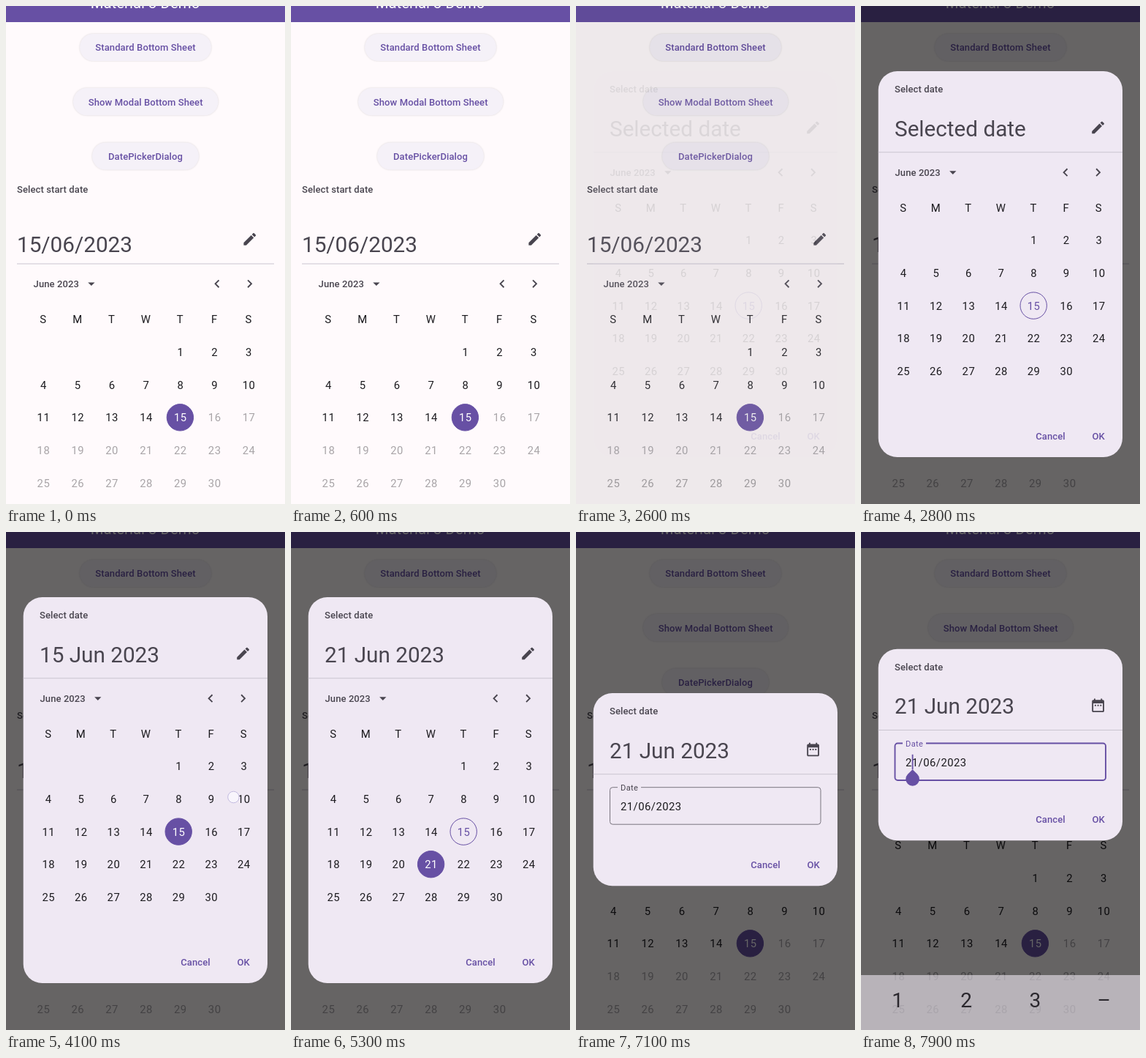
Recreate the animation shown at these times as an HTML page. Size 382 by 680 pixels, loop 8 s.

```html
<!DOCTYPE html>
<html lang="en">
<head>
<meta charset="utf-8">
<title>Date picker</title>
<style>
html, body { margin: 0; width: 100%; height: 100%; overflow: hidden; background: #fffafc; }
svg { display: block; width: 382px; height: 680px; font-family: Roboto, Arial, sans-serif; }
.pill { filter: drop-shadow(0 0.9px 0.9px rgba(0, 0, 0, .15)); }
</style>
</head>
<body>
<svg id="stage" viewBox="0 0 382 680"></svg>
<script>
const LOOP = 8000;
const PRIMARY = '#6750A4', INK = '#1C1B1F', MUTED = '#49454F', RULE = '#CAC4D0';
const SHEET = '#EFE8F3';
const ICONS = {
  edit: 'M3 17.25V21h3.75L17.81 9.94l-3.75-3.75L3 17.25zM20.71 7.04c.39-.39.39-1.02 0-1.41l-2.34-2.34c-.39-.39-1.02-.39-1.41 0l-1.83 1.83 3.75 3.75 1.83-1.83z',
  date: 'M9 11H7v2h2v-2zm4 0h-2v2h2v-2zm4 0h-2v2h2v-2zm2-7h-1V2h-2v2H8V2H6v2H5c-1.11 0-2 .9-2 2v14c0 1.1.89 2 2 2h14c1.1 0 2-.9 2-2V6c0-1.1-.9-2-2-2zm0 16H5V9h14v11z',
  prev: 'M15.41 7.41L14 6l-6 6 6 6 1.41-1.41L10.83 12z',
  next: 'M8.59 16.59L13.17 12 8.59 7.41 10 6l6 6-6 6z',
  drop: 'M7 10l5 5 5-5z'
};
const stage = document.getElementById('stage');

function add(parent, tag, attrs = {}) {
  const node = document.createElementNS('http://www.w3.org/2000/svg', tag);
  for (const key in attrs) node.setAttribute(key, attrs[key]);
  parent.appendChild(node);
  return node;
}
const group = (parent) => add(parent, 'g');
const rect = (parent, x, y, width, height, fill, extra) =>
  add(parent, 'rect', { x, y, width, height, fill, ...extra });
const line = (parent, x1, x2, y) =>
  add(parent, 'line', { x1, x2, y1: y, y2: y, stroke: RULE, 'stroke-width': 1 });

// Text is placed by the vertical middle of its capitals.
function text(parent, str, x, mid, size, fill, extra) {
  const node = add(parent, 'text', { x, y: mid + size * 0.355, 'font-size': size, fill, ...extra });
  node.textContent = str;
  return node;
}
const CENTER = { 'text-anchor': 'middle' };
const LABEL = { 'font-weight': 500, 'letter-spacing': 0.1 };
const BODY = { 'letter-spacing': 0.46 };

function icon(parent, name, x, y) {
  return add(parent, 'path', {
    d: ICONS[name], fill: MUTED,
    transform: `translate(${x} ${y}) scale(.93) translate(-12 -12)`
  });
}

function monthBar(parent, x, y, arrows) {
  text(parent, 'June 2023', x, y, 13, MUTED, LABEL);
  icon(parent, 'drop', x + 79.3, y);
  icon(parent, 'prev', arrows, y);
  icon(parent, 'next', arrows + 44.6, y);
}

// Returns a function that marks the selected day.
function calendar(parent, x0, stepX, y0, lastEnabled) {
  const stepY = 44.6, cells = [];
  [...'SMTWTFS'].forEach((d, i) => text(parent, d, x0 + i * stepX, y0, 14.85, INK, { ...CENTER, ...BODY }));
  for (let day = 1; day <= 30; day++) {
    const slot = day + 3;
    const x = x0 + slot % 7 * stepX, y = y0 + (1 + Math.floor(slot / 7)) * stepY;
    const disc = add(parent, 'circle', { cx: x, cy: y, r: 18.2, fill: 'none', 'stroke-width': 1 });
    const label = text(parent, day, x + 0.4, y + 0.3, 14.85, INK, { ...CENTER, ...BODY });
    if (day > lastEnabled) label.setAttribute('opacity', 0.38);
    cells.push({ day, disc, label });
  }
  return (selected) => cells.forEach(({ day, disc, label }) => {
    const on = day === selected, today = day === 15;
    disc.setAttribute('fill', on ? PRIMARY : 'none');
    disc.setAttribute('stroke', on || today ? PRIMARY : 'none');
    label.setAttribute('fill', on ? '#fff' : today ? PRIMARY : INK);
  });
}

// Page
const page = group(stage);
rect(page, 0, 0, 382, 680, '#fffafc');
rect(page, 0, 0, 382, 22, PRIMARY);
text(page, 'Material 3 Demo', 190.5, -4.2, 20.4, '#fff', CENTER);
[['Standard Bottom Sheet', 101, 180, 56.5],
 ['Show Modal Bottom Sheet', 92, 198.5, 130.7],
 ['DatePickerDialog', 118, 146, 205]].forEach(([label, x, w, mid]) => {
  rect(page, x, mid - 18.6, w, 37.2, '#F5F1F8', { rx: 18.6, class: 'pill' });
  text(page, label, x + w / 2, mid + 0.2, 13, PRIMARY, { ...CENTER, ...LABEL });
});
text(page, 'Select start date', 15, 250.8, 13, MUTED, LABEL);
text(page, '15/06/2023', 15, 325, 29.7, MUTED);
icon(page, 'edit', 333.8, 318.3);
line(page, 15, 367, 352);
monthBar(page, 37.6, 379.3, 289);
calendar(page, 51, 46.85, 428, 15)(15);

const scrim = rect(stage, 0, 0, 382, 680, '#000');

// Dialog, drawn from its own top edge
const dialog = group(stage);
const sheet = rect(dialog, 23.7, 0, 334.3, 527, SHEET, { rx: 26 });
text(dialog, 'Select date', 46, 24.2, 13, MUTED, LABEL);
const headline = text(dialog, '', 46, 78, 29.7, MUTED);
const editIcon = icon(dialog, 'edit', 324.6, 77);
const dateIcon = icon(dialog, 'date', 324.6, 77);
line(dialog, 23.7, 358, 110.7);

const month = group(dialog);
monthBar(month, 46.5, 138.2, 280);
const markDay = calendar(month, 57.8, 44.6, 186.3, 30);

const entry = group(dialog);
const field = rect(entry, 46.5, 128.7, 288.5, 50.5, 'none', { rx: 3.7 });
rect(entry, 57, 124, 32, 9, SHEET);
const fieldLabel = text(entry, 'Date', 61, 128.9, 11.1, MUTED, { 'letter-spacing': 0.37 });
text(entry, '21/06/2023', 61, 154.7, 14.85, INK, BODY);
const caret = group(entry);
rect(caret, 69.7, 144, 1.8, 20.5, PRIMARY);
add(caret, 'path', {
  d: 'M70.6 164.4L77.2 171A9.3 9.3 0 1 1 64 171z', fill: PRIMARY
});

const actions = group(dialog);
text(actions, 'Cancel', 259.5, 0, 13, PRIMARY, { ...CENTER, ...LABEL });
text(actions, 'OK', 325.2, 0, 13, PRIMARY, { ...CENTER, ...LABEL });

// Keyboard
const keyboard = group(stage);
rect(keyboard, 0, 0, 382, 300, '#F3EDF7', { opacity: 0.58 });
['1', '2', '3', '–'].forEach((key, i) =>
  text(keyboard, key, 50 + i * 94.2, 34.5, 28, '#2B282E', CENTER));

const touch = add(stage, 'circle', { r: 7.8, fill: '#F8F5FC', stroke: '#C3BBE0', 'stroke-width': 1 });
const TAPS = [
  { from: 3500, to: 3750, x: 234, y: 406 },
  { from: 3980, to: 4400, x: 311.5, y: 362 },
  { from: 4850, to: 5200, x: 190, y: 452 },
  { from: 6400, to: 6820, x: 330.3, y: 146.5 }
];

const ramp = (t, from, to) => Math.min(1, Math.max(0, (t - from) / (to - from)));
const ease = (k) => k * k * (3 - 2 * k);
const show = (node, on) => node.setAttribute('display', on ? 'inline' : 'none');

function render(t) {
  const opened = ease(ramp(t, 2560, 2760));
  scrim.setAttribute('opacity', 0.6 * opened);
  dialog.setAttribute('opacity', opened);

  const selected = t < 3650 ? 0 : t < 4400 ? 15 : t < 5100 ? 10 : 21;
  headline.textContent = selected ? `${selected} Jun 2023` : 'Selected date';
  markDay(selected);

  const typing = t >= 6650;
  show(editIcon, !typing);
  show(dateIcon, typing);
  const swap = ease(ramp(t, 6710, 6950));
  month.setAttribute('opacity', 1 - swap);
  entry.setAttribute('opacity', swap);

  // The sheet keeps its height until the crossfade ends, then snaps.
  const compact = t >= 6950;
  const lift = ease(ramp(t, 7720, 7880));
  const top = compact ? 220 - 60.2 * lift : 89;
  const height = compact ? 263.3 - 1.8 * lift : 527;
  dialog.setAttribute('transform', `translate(0 ${top})`);
  sheet.setAttribute('height', height);
  actions.setAttribute('transform', `translate(0 ${height - 28.7})`);

  const focused = t >= 7560;
  field.setAttribute('stroke', focused ? PRIMARY : '#79747E');
  field.setAttribute('stroke-width', focused ? 1.9 : 1);
  fieldLabel.setAttribute('fill', focused ? PRIMARY : MUTED);
  show(caret, focused);

  const risen = ramp(t, 7780, 7900);
  show(keyboard, risen > 0);
  keyboard.setAttribute('opacity', risen);
  keyboard.setAttribute('transform', `translate(0 ${680 - 75 * ease(risen)})`);

  const tap = TAPS.find(({ from, to }) => t >= from && t < to);
  show(touch, tap);
  if (tap) {
    touch.setAttribute('cx', tap.x);
    touch.setAttribute('cy', tap.y);
    touch.setAttribute('opacity', 1 - ramp(t, tap.to - 200, tap.to));
  }
}

function tick() {
  render(performance.now() % LOOP);
  requestAnimationFrame(tick);
}
tick();
</script>
</body>
</html>
```
